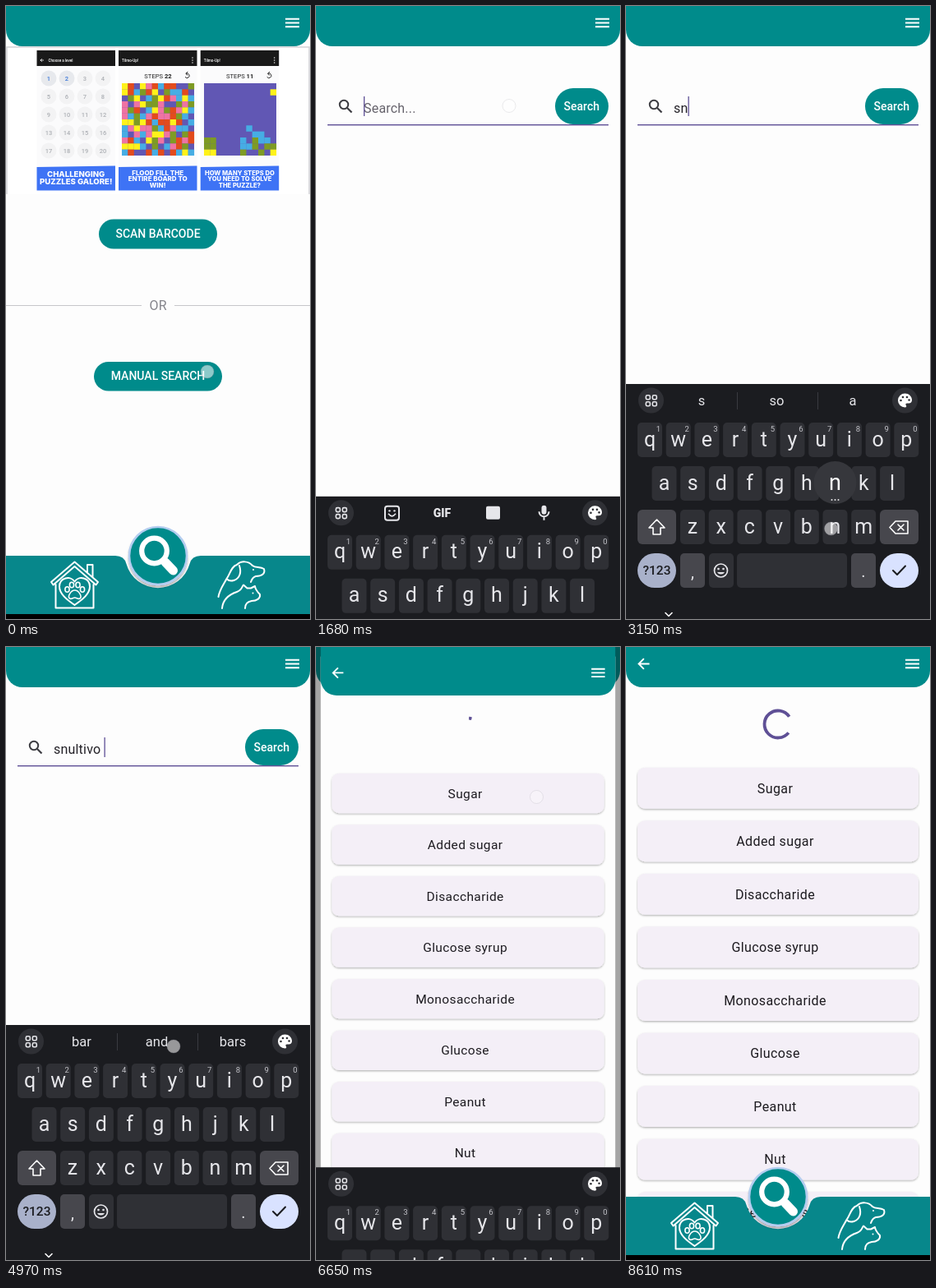
Recreate the animation shown at these times as an HTML page. Size 370 px wide and 746 px high, loop 8.68 s.

```html
<!DOCTYPE html>
<html lang="en">
<head>
<meta charset="utf-8">
<style>
html, body { margin: 0; width: 100%; height: 100%; overflow: hidden; background: #fdfdfd; }
svg { display: block; width: 370px; height: 746px; font-family: Roboto, sans-serif; }
text { white-space: pre; }
.mid { text-anchor: middle; }
.line { fill: none; stroke: #fff; stroke-width: 2; stroke-linecap: round; stroke-linejoin: round; }
.thin { stroke-width: 1.6; }
.sharp { stroke-width: 1.9; stroke-linecap: butt; stroke-linejoin: miter; }
.caption { font-family: Inter, sans-serif; font-weight: 800; fill: #fff; text-anchor: middle; }
</style>
</head>
<body>
<svg viewBox="0 0 370 746">
  <defs>
    <filter id="soft" x="-10%" y="-20%" width="120%" height="150%">
      <feDropShadow dx="0" dy="1.2" stdDeviation=".9" flood-opacity=".3"/>
    </filter>
    <filter id="lift" x="-20%" y="-20%" width="140%" height="150%">
      <feDropShadow dx="0" dy="2.5" stdDeviation="1.2" flood-opacity=".3"/>
    </filter>
  </defs>
  <g id="home"></g>
  <g id="search"></g>
  <rect id="dim" width="370" height="746"/>
  <g id="list"></g>
  <g id="nav"></g>
  <g id="keyboard"></g>
  <g id="touch"><circle r="8" fill="#fff" fill-opacity=".55" stroke="#85858c" stroke-opacity=".35"/></g>
</svg>
<script>
const LOOP = 8680, TEAL = '#008b8b', PURPLE = '#5f5096';
const $ = id => document.getElementById(id);
const clamp = v => Math.max(0, Math.min(1, v));
const ramp = (t, from, length) => clamp((t - from) / length);
const easeOut = p => 1 - (1 - p) ** 3;
const show = (id, on) => $(id).setAttribute('display', on ? 'inline' : 'none');
const set = (id, attrs) => { for (const k in attrs) $(id).setAttribute(k, attrs[k]); };
const range = n => [...Array(n).keys()];

const rect = (x, y, w, h, fill, r = 0, more = '') =>
  `<rect x="${x}" y="${y}" width="${w}" height="${h}" rx="${r}" fill="${fill}" ${more}/>`;
const circle = (x, y, r, fill, more = '') => `<circle cx="${x}" cy="${y}" r="${r}" fill="${fill}" ${more}/>`;
const label = (x, y, size, fill, str, more = '') =>
  `<text class="mid" x="${x}" y="${y}" font-size="${size}" fill="${fill}" ${more}>${str}</text>`;
const line = (d, kind = '', more = '') => `<path class="line ${kind}" d="${d}" ${more}/>`;

const header = back => `<path fill="${TEAL}" d="M0-30H370V29a20 20 0 0 1-20 20H20a20 20 0 0 1-20-20Z"/>` +
  line('M340 15.7H357M340 20.5H357M340 25.3H357', 'sharp') +
  (back ? line('M28.5 20.5H16M21.8 14.2L15.5 20.5L21.8 26.8', 'sharp') : '');
const page = rect(0, 0, 370, 800, '#fdfdfd');

// Home page with its banner
function appScreen(x, title, indent, captions, size, top, step, body) {
  return rect(x, 54, 95.5, 170, '#fbfbfc') + rect(x, 54, 95.5, 19, '#191919') +
    `<text x="${x + indent}" y="68" font-size="4.6" font-weight="500" fill="#fff">${title}</text>` + body +
    `<path fill="#3e73f5" d="M${x} 196L${x + 95.5} 194.5V224.5H${x}Z"/>` +
    captions.map((c, i) =>
      `<text class="caption" x="${x + 47.7}" y="${top + i * step}" font-size="${size}">${c}</text>`).join('');
}

const HUES = ['#fff21a', '#6157b4', '#e34b1c', '#46ade4', '#7e9b24', '#ef73a3'];
function board(x, pick) {
  const cell = 88 / 12;
  return rect(x, 94, 88, 88, HUES[1]) + range(144).map(i => {
    const hue = pick(i % 12, Math.floor(i / 12));
    return hue === 1 ? '' : rect(x + i % 12 * cell, 94 + Math.floor(i / 12) * cell, cell + .1, cell + .1, HUES[hue]);
  }).join('');
}
const steps = (x, n) => label(x + 48, 88, 7.6, '#222', `STEPS <tspan font-weight="700">${n}</tspan>`) +
  `<path d="M${x + 82} 82.3a2.8 2.8 0 1 1-1 4M${x + 84.2} 80l-2.4 2.3 2.4 2" fill="none" stroke="#222"/>` +
  [63, 66, 69].map(y => circle(x + 90, y, .7, '#fff')).join('');

let seed = 11;
const random = () => (seed = seed * 16807 % 2147483647) / 2147483647;
const BLUE = ['7,7', '8,8', '9,8', '9,9', '6,10', '7,10', '10,9', '6,9'];
const OLIVE = ['0,9', '1,9', '0,10', '1,10', '6,11', '8,9', '8,10', '10,10', '11,10', '9,11'];
const YELLOW = ['11,1', '0,11', '1,11', '11,11'];
const leftover = (c, r) => {
  const at = c + ',' + r;
  return BLUE.includes(at) ? 3 : OLIVE.includes(at) ? 4 : YELLOW.includes(at) ? 0 : 1;
};
const levels = range(20).map(i => {
  const x = 52 + i % 4 * 22, y = 88 + Math.floor(i / 4) * 22, lit = i < 2;
  return circle(x, y, 9.5, lit ? '#e7e9ed' : '#f3f3f4') +
    label(x, y + 2.7, 7.5, lit ? '#3976d8' : '#adb0b5', i + 1, 'font-weight="500"');
}).join('');

const pill = (x, y, w, h, str, size) => rect(x, y, w, h, TEAL, h / 2) +
  label(x + w / 2, y + h / 2 + size * .33, size, '#fff', str, 'font-weight="500"');

$('home').innerHTML = page + header(false) +
  rect(1, 50, 368, 179, '#fff') + '<path d="M1 229V50H369V229" fill="none" stroke="#d3d3d7" stroke-width="1.5"/>' +
  appScreen(37.5, 'Choose a level', 14, ['CHALLENGING', 'PUZZLES GALORE!'], 9.6, 208, 9.4,
    levels + line('M45.5 66H42M43.5 64.5L42 66L43.5 67.5', '', 'style="stroke-width:.8"')) +
  appScreen(137, 'Tilmo-Up!', 4, ['FLOOD FILL THE', 'ENTIRE BOARD TO', 'WIN!'], 8, 205.5, 7.9,
    steps(137, 22) + board(141, () => Math.floor(random() * 6))) +
  appScreen(236.7, 'Tilmo-Up!', 4, ['HOW MANY STEPS DO', 'YOU NEED TO SOLVE', 'THE PUZZLE?'], 7.6, 205.5, 7.6,
    steps(236.7, 11) + board(241, leftover)) +
  pill(113, 259.5, 144, 36, 'SCAN BARCODE', 14) + pill(107, 433, 156, 35.5, 'MANUAL SEARCH', 14) +
  rect(0, 364, 165, 1, '#c6c6ca') + rect(205, 364, 165, 1, '#c6c6ca') +
  label(185.3, 370, 16, '#85858c', 'OR', 'letter-spacing=".4"');

// Search page
$('search').innerHTML = page + header(false) +
  '<path d="M38 124L43.5 129.5" stroke="#3d3d42" stroke-width="2.2"/>' +
  circle(34, 120, 5.2, 'none', 'stroke="#3d3d42" stroke-width="2"') +
  '<text id="query" x="58" y="129.5" font-size="16" letter-spacing=".2"></text>' +
  rect(58, 110, 1.3, 24, PURPLE, 0, 'id="caret"') + rect(14, 144, 342, 1.4, PURPLE) +
  rect(291, 100, 65, 44, TEAL, 22) + label(323.3, 127, 14, '#fff', 'Search', 'font-weight="500"');

// Ingredient list
const ITEMS = ['Sugar', 'Added sugar', 'Disaccharide', 'Glucose syrup', 'Monosaccharide',
  'Glucose', 'Peanut', 'Nut', 'Seed chips'];
$('list').innerHTML = page + header(true) +
  `<path id="spinner" fill="none" stroke="${PURPLE}" stroke-width="3.8"/>` +
  ITEMS.map((item, i) => rect(14, 146.7 + i * 64.55, 342, 50, '#f4eff7', 9, 'filter="url(#soft)"') +
    label(181.5, 177.5 + i * 64.55, 16, '#1d1b20', item, 'letter-spacing=".4"')).join('');

// Bottom navigation
const toes = [[74.5, 710], [80, 704.5], [87.5, 704.5], [93, 710]]
  .map(([x, y]) => `<ellipse class="line thin" cx="${x}" cy="${y}" rx="2.6" ry="3.3"/>`).join('');
const house = line('M57.5 704.5L55 701L83.5 676.5L112 701L109.5 704.5L83.5 682ZM60.5 704V732.5H106.5V704M99 689V680H105.5V695') +
  line('M83.5 729C74 722.5 65 715.5 65 706.5C65 696 78.5 692.5 83.5 700.5C88.5 692.5 102 696 102 706.5C102 715.5 93 722.5 83.5 729Z') +
  toes + line('M83.7 711C79 711 74.5 718.5 77.5 721C79.5 722.3 81.5 720 83.7 720S88 722.3 90 721C93 718.5 88.5 711 83.7 711Z', 'thin');
const pets = line('M281 680C286 675 295 675 300 681C304 684 309 682 314 685C316 691 311 694 304 694C300 695 299 698 298 701M281 680C274 682 273 691 268.500 697C273 702 282 699 284.500 692C286 688 285 684 284 681M268.500 697C265 704 260 710 258.500 719') +
  line('M263 733C264 722 272 716 281 713C287 711 287 707 289 704.500L293.500 708.500H298L303 706C303.500 710 305 712 309 716C310 721 305 724 299 724C293 725 291 728 291 733') +
  circle(301, 686, 1, '#fff') + circle(300.5, 714.5, 1, '#fff');
$('nav').innerHTML =
  '<path fill="#07878b" d="M0 669H133Q144 669 146.5 679A40 40 0 0 0 223.5 679Q226 669 237 669H370V741H0Z"/>' +
  rect(0, 740, 370, 6, '#000') + house + pets +
  rect(150, 634, 70, 70, TEAL, 35, 'id="fab" stroke="#b3cdf0" stroke-width="2.5" filter="url(#lift)"') +
  '<g id="lens" stroke="#fff" fill="none"><circle cx="180.5" cy="663" r="15.3" stroke-width="6.3"/>' +
  '<path d="M194 677L203.5 687" stroke-width="11" stroke-linecap="round"/></g>';

// Keyboard, laid out from its own top edge
const KEY = '#2f3035', KEY_ALT = '#47474d', INK = '#e6e6ea', PITCH = 34.7;
const keys = {};
const letterRow = (letters, x0, y) => [...letters].map((ch, i) => {
  const x = x0 + i * PITCH, cx = x + 15;
  keys[ch] = [cx, y + 21];
  return rect(x, y, 30, 42, KEY, 5) + label(cx, y + 28.5, 25, INK, ch);
}).join('');
const toolbar = rect(84, 12, 17, 17, 'none', 3, `stroke="${INK}" stroke-width="2"`) +
  `<path d="M88 21Q92.5 27 97 21" fill="none" stroke="${INK}" stroke-width="1.6"/>` +
  circle(89.5, 17.5, 1.2, INK) + circle(95.5, 17.5, 1.2, INK) +
  label(153.5, 25, 14, INK, 'GIF', 'font-weight="900"') + rect(207, 12, 17, 16, INK, 2) +
  rect(274.5, 11, 6, 11, INK, 3) +
  `<path d="M271.5 18.5a6 6 0 0 0 12 0M277.5 25V29" fill="none" stroke="${INK}" stroke-width="2"/>`;

$('keyboard').innerHTML = rect(0, 0, 370, 300, '#1b1c20') +
  circle(30.5, 20, 15.5, KEY) + circle(339.5, 20, 15.5, KEY) +
  [[25, 14.5], [33, 14.5], [25, 22.5], [33, 22.5]].map(([x, y]) =>
    rect(x - .7, y - .7, 5, 5, 'none', 1.6, `stroke="${INK}" stroke-width="1.6"`)).join('') +
  '<path fill="#fff" d="M339.5 11.5a8.5 8.5 0 1 0 0 17c2 0 2-1.7 1.3-2.6c-1-1.7 0-2.4 1.2-2.4h2c2.5 0 4-1.6 4-4c0-4.7-4-8-8.5-8Z"/>' +
  [[334.5, 20], [337, 16], [342, 16], [344.6, 19.5]].map(([x, y]) => circle(x, y, 1.3, KEY)).join('') +
  `<g id="tools">${toolbar}</g>` +
  `<g id="hints">${rect(135, 10, 1, 21, '#3a3b40')}${rect(233, 10, 1, 21, '#3a3b40')}` +
  [92, 183.5, 276].map((x, i) => label(x, 26, 16.5, INK, '', `id="hint${i}"`)).join('') + '</g>' +
  letterRow('qwertyuiop', 14, 47) +
  [...'1234567890'].map((d, i) => label(39.5 + i * PITCH, 58, 9.5, '#c4c4ca', d)).join('') +
  letterRow('asdfghjkl', 31.5, 100) + rect(14, 153, 47, 42, KEY_ALT, 6) + letterRow('zxcvbnm', 66, 153) +
  rect(309, 153, 47, 42, KEY_ALT, 6) +
  line('M37.5 165L47 175H42V183H33V175H28Z', 'thin') +
  line('M328 167H343V182H328L321 174.5ZM331 171L338 178M338 171L331 178', 'thin') +
  rect(14, 206, 47, 42, '#a9b1ca', 21) + label(37.5, 232, 15.5, '#1b1c20', '?123', 'font-weight="500"') +
  rect(66, 206, 30, 42, KEY_ALT, 5) + label(81, 236, 20, INK, ',') +
  rect(101, 206, 30, 42, KEY, 5) + circle(115.5, 227, 8, 'none', `stroke="${INK}" stroke-width="1.7"`) +
  circle(112.5, 225, 1.3, INK) + circle(118.5, 225, 1.3, INK) +
  `<path d="M111 229a5 4.5 0 0 0 9 0Z" fill="${INK}"/>` +
  rect(135, 206, 134, 42, KEY, 5) + rect(274, 206, 30, 42, KEY_ALT, 5) + label(289, 235, 20, INK, '.') +
  rect(309, 206, 47, 42, '#d9e2ff', 21) + line('M325 227L330 232L340 221.5', '', 'style="stroke:#1b1c20"') +
  line('M48 278.5L52 282.5L56 278.5', 'thin') +
  `<g id="popup">${circle(0, 0, 26, '#36373c')}${label(0, 8.5, 27, '#fff', '', 'id="popupKey"')}` +
  `${[-4, 0, 4].map(x => circle(x, 21, 1, INK)).join('')}</g>`;

// Story: taps as [x, y, pressed, released, key], typed text as [time, text]
const press = (ch, at, dx = 0, dy = 3) => [keys[ch][0] + dx, 460 + keys[ch][1] + dy, at, at + 110, ch];
const TAPS = [
  [245, 445, 0, 70], [235, 121.5, 1400, 1560],
  press('s', 2380), press('n', 3070, -5, 2), press('u', 3500), press('l', 3850), press('t', 4200),
  [204, 486, 4830, 4980], [320, 124, 5600, 5710], [268.5, 182.5, 6400, 6530]
];
const TYPED = [[0, ''], [2430, 's'], [3120, 'sn'], [3550, 'snu'], [3900, 'snul'], [4250, 'snult'], [4940, 'snultivo ']];
const HINTS = [[0, []], [2430, ['s', 'so', 'a']], [3550, ['snu', 'snug', 'snub']],
  [4250, ['snult', 'snultivo', 'snuff']], [4940, ['bar', 'and', 'bars']], [6560, []]];
const latest = (track, t) => track.filter(([at]) => at <= t).pop();
const FOCUS = 1560, KEYS_UP = 1620, KEYS_DOWN = 6587, OPEN_LIST = 6450, RELEASE = 220;

function drawSearch(t) {
  const [at, typed] = latest(TYPED, t), query = $('query');
  query.textContent = typed || 'Search...';
  query.setAttribute('fill', typed ? '#232127' : '#66636c');
  const x = 58 + (typed ? query.getComputedTextLength() : 0);
  $('caret').setAttribute('x', x);
  show('caret', t >= FOCUS && (t - Math.max(at, FOCUS)) % 1000 < 500);
}

function drawKeyboard(t) {
  const up = easeOut(ramp(t, KEYS_UP, 280)), down = easeOut(ramp(t, KEYS_DOWN, 240));
  set('keyboard', { transform: `translate(0 ${746 - 286 * (up - down)})` });
  show('keyboard', up > 0 && down < 1);
  const words = latest(HINTS, t)[1];
  show('tools', t < TYPED[1][0]);
  show('hints', words.length);
  words.forEach((word, i) => { $('hint' + i).textContent = word; });
  const hit = TAPS.find(([, , from, to, ch]) => ch && t >= from && t < to);
  show('popup', hit);
  if (hit) {
    const [x, y] = keys[hit[4]];
    set('popup', { transform: `translate(${x} ${y - 54})` });
    $('popupKey').textContent = hit[4];
  }
}

function drawSpinner(t) {
  const turns = Math.max(0, t - 7210) / 933, u = turns % 1, r = 16.5;
  const smooth = p => p * p * (3 - 2 * p);
  const head = smooth(clamp(u * 2)), tail = smooth(clamp(u * 2 - 1));
  const from = 4 + turns * 323 + 275 * tail, to = from + 12 + 275 * (head - tail);
  const point = deg => {
    const a = (deg - 90) * Math.PI / 180;
    return `${185 + r * Math.cos(a)} ${94 + r * Math.sin(a)}`;
  };
  set('spinner', { d: `M${point(from)}A${r} ${r} 0 ${to - from > 180 ? 1 : 0} 1 ${point(to)}` });
}

function drawList(t) {
  const on = t >= OPEN_LIST;
  show('list', on);
  show('dim', on);
  if (!on) return;
  const scale = t > 7350 ? 1 : 1 - .07 * Math.exp((OPEN_LIST - t) / 247);
  const fade = ramp(t, OPEN_LIST, 150);
  set('list', { opacity: fade, transform: `translate(185 373) scale(${scale}) translate(-185 -373)` });
  set('dim', { opacity: .35 * fade });
  drawSpinner(t);
}

function drawNav(t) {
  const first = t < KEYS_UP;
  show('nav', first || t >= 6860);
  const grow = first ? 1 : ramp(t, 7070, 280), k = .46 + .54 * grow;
  set('fab', { rx: 4 + 31 * grow });
  set('lens', { transform: `translate(185 669) scale(${k}) translate(-185 -669)` });
}

function drawTouch(t) {
  const tap = TAPS.find(([, , from, to]) => t >= from && t < to + RELEASE);
  show('touch', tap);
  if (tap) set('touch', { transform: `translate(${tap[0]} ${tap[1]})`, opacity: 1 - ramp(t, tap[3], RELEASE) });
}

function draw(t) {
  set('search', { opacity: ramp(t, 350, 210) });
  drawSearch(t);
  drawList(t);
  drawNav(t);
  drawKeyboard(t);
  drawTouch(t);
}

const start = performance.now();
function tick() {
  draw((performance.now() - start) % LOOP);
  requestAnimationFrame(tick);
}
tick();
</script>
</body>
</html>
```
